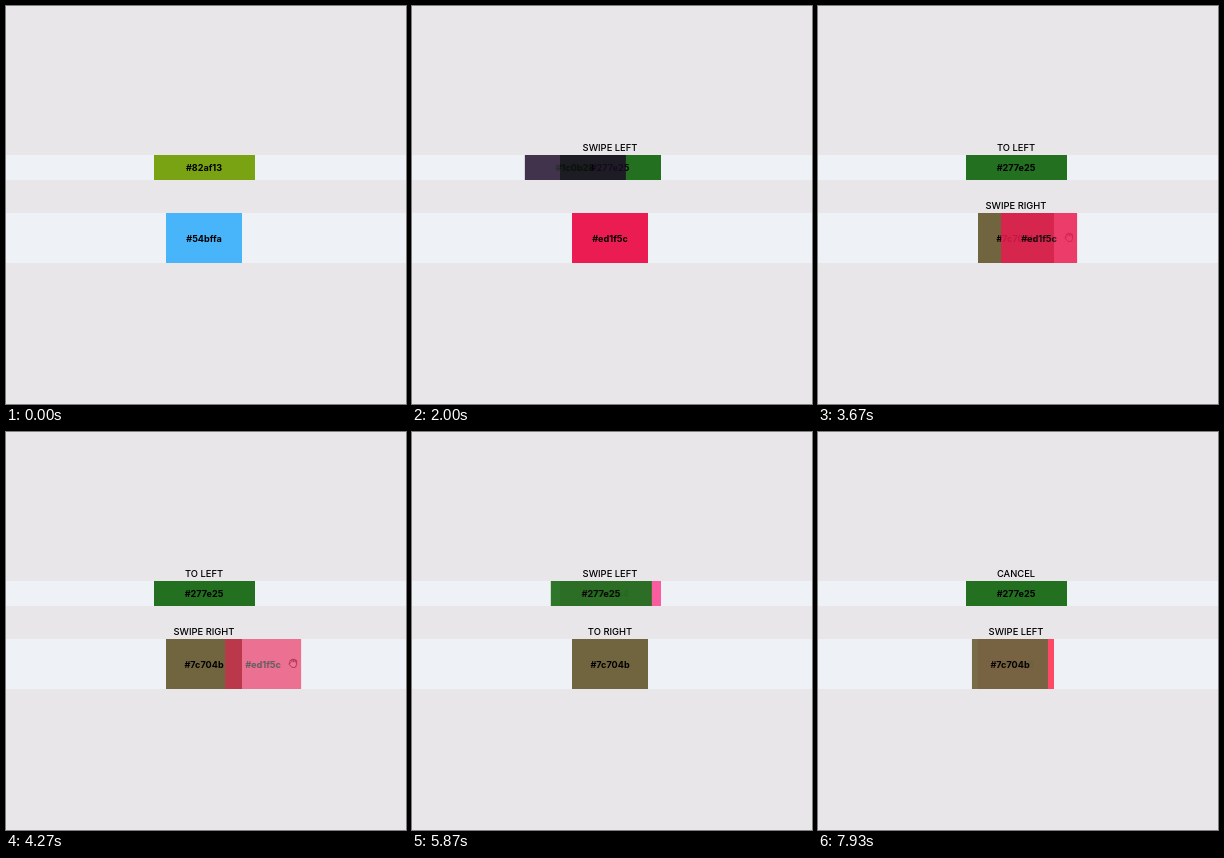
Recreate the animation shown at these times as an HTML page. Size 400x398 px, loop 8000 ms.

```html
<!DOCTYPE html>
<html lang="en">
<head>
<meta charset="utf-8">
<title>Swipe cards</title>
<style>
  html, body { margin: 0; width: 100%; height: 100%; overflow: hidden; background: #e8e6e9; }
  body { position: relative; font-family: Inter, "Open Sans", sans-serif; color: #000; }
  .band { position: absolute; left: 0; width: 100%; background: #eef1f5; overflow: hidden; }
  #top { top: 149px; height: 25px; --w: 101px; --x: 147.5px; }
  #bottom { top: 207px; height: 50px; --w: 76px; --x: 160px; }
  .card {
    position: absolute; top: 0; left: var(--x); width: var(--w); height: 100%;
    display: flex; align-items: center; justify-content: center;
    font-size: 9.1px; font-weight: 700;
  }
  .label {
    position: absolute; left: 98px; width: 200px; height: 12px; line-height: 12px;
    text-align: center; font-size: 9.4px; font-weight: 500; white-space: nowrap; opacity: 0;
  }
  #cursor { position: absolute; left: 0; top: 0; width: 12px; height: 12px; margin: -6px; overflow: visible; }
  #cursor g { fill: #fff; stroke: #222; stroke-width: .8; stroke-linejoin: round; stroke-linecap: round; opacity: 0; }
</style>
</head>
<body>
<div class="band" id="top"></div>
<div class="band" id="bottom"></div>
<svg id="cursor" viewBox="0 0 12 12">
  <g id="arrow"><path d="M3 1V10.5L5.3 8.4 6.8 11.6 8.2 11 6.8 7.9H9.8Z"/></g>
  <g id="open"><path d="M3.4 7.2V3q0-.9.8-.9T5 3V1.7q0-.9.8-.9t.8.9V2.3q0-.8.8-.8t.8.8V3.4q0-.7.8-.7t.8.8V7.6Q9.8 11.2 6.6 11.2 4.6 11.2 3.6 9.6L1.5 6.6q-.3-.8.4-1 .6-.1 1.5 1.6Z"/><path d="M5 3V6M6.6 2.3V6M8.2 3.4V6" fill="none"/></g>
  <g id="fist"><path d="M2.8 6V4.4q0-1 .9-1 .3-1 1.2-.8 1-.8 1.7 0 1-.5 1.5.4 1.3-.2 1.3 1V7.6q0 3-2.9 3-1.8 0-2.8-1.5L2.1 7.3Q1.7 6.3 2.8 6Z"/><path d="M4.9 3V4.8M6.6 2.9V4.8M8.1 3.4V5" fill="none"/></g>
</svg>

<script>
const LOOP = 8000;

const rows = {
  top: {
    width: 101, labelY: 136,
    // card: colour, code, [time, offset, easing] moves
    cards: [
      ['#79a312', '#82af13', [[240, 0, 'ease'], [740, 202]]],
      ['#1c0a26', '#1c0b28', [[1750, 0], [2000, -35, 'ease-out'], [2180, -50, 'ease'], [2680, -202]]],
      ['#237020', '#277e25', [[5600, 0, 'ease-in-out'], [6200, -22], [6270, -22], [6730, 19, 'ease-out'],
        [7000, 28], [7150, 28, 'ease'], [7650, 0]]],
      ['#fa5d9f', '#fe68a4', []]
    ],
    labels: [[0, 'AUTO TRANSITION'], [1750, 'SWIPE LEFT'], [2180, 'TO LEFT'],
      [5600, 'SWIPE LEFT'], [6517, 'SWIPE RIGHT'], [7150, 'CANCEL']]
  },
  bottom: {
    width: 76, labelY: 194,
    cards: [
      ['#48b4f9', '#54bffa', [[240, 0, 'ease'], [740, 152]]],
      ['#ea1c51', '#ed1f5c', [[3480, 0], [3670, 23, 'ease-out'], [4400, 61], [4475, 61, 'ease'], [4975, 152]]],
      ['#716540', '#7c704b', [[7800, 0], [7930, -6], [8000, -9]]],
      ['#ff4766', '#ff4d66', []]
    ],
    labels: [[0, 'AUTO TRANSITION'], [3480, 'SWIPE RIGHT'], [4475, 'TO RIGHT'], [7800, 'SWIPE LEFT']]
  }
};

const cursorPath = [
  [750, 92, -10, 'ease-in-out'], [1090, 222, 162], [1750, 222, 162], [2000, 187, 162, 'ease-out'],
  [2180, 172, 162], [2300, 172, 162, 'ease-in-out'], [2870, 228, 232], [3480, 228, 231],
  [3670, 251, 231, 'ease-out'], [4400, 289, 231], [4475, 289, 231, 'ease-out'], [4870, 215, 211, 'ease-in-out'],
  [5250, 231, 161], [5600, 231, 161, 'ease-in-out'], [6200, 209, 161], [6270, 209, 161],
  [6730, 250, 161, 'ease-out'], [7000, 259, 161], [7150, 259, 161, 'ease-in-out'],
  [7650, 202, 240], [7800, 202, 240], [7930, 196, 240], [8000, 193, 240]
];

const cursorPoses = {
  arrow: [[750, 1070], [2520, 2640], [4900, 5130], [7330, 7460]],
  open: [[1070, 1720], [2180, 2520], [2640, 3450], [4475, 4900], [5130, 5570], [7150, 7330], [7460, 7770]],
  fist: [[1720, 2180], [3450, 4475], [5570, 7150], [7770, LOOP]]
};

function play(el, frames) {
  el.animate(frames, { duration: LOOP, iterations: Infinity });
}

// Plays style keys, holding the first and last one to the ends of the loop.
function move(el, keys, style) {
  if (!keys.length) return;
  const frames = keys.map(key => ({ offset: key[0] / LOOP, easing: key[3] || 'linear', ...style(key) }));
  const first = { ...frames[0], offset: 0, easing: 'linear' };
  const last = { ...frames[frames.length - 1], offset: 1 };
  play(el, [first, ...frames, last]);
}

function showDuring(el, ranges) {
  const key = (time, opacity) => ({ offset: time / LOOP, opacity, easing: 'steps(1, end)' });
  play(el, [key(0, 0), ...ranges.flatMap(([from, to]) => [key(from, 1), key(to, 0)]), key(LOOP, 0)]);
}

function add(parent, className, text) {
  const el = document.createElement('div');
  el.className = className;
  el.textContent = text;
  parent.append(el);
  return el;
}

const cursor = document.getElementById('cursor');

for (const [id, { width, labelY, cards, labels }] of Object.entries(rows)) {
  const band = document.getElementById(id);
  cards.forEach(([color, code, moves], i) => {
    const card = add(band, 'card', code);
    card.style.background = color;
    card.style.zIndex = cards.length - i;
    move(card, moves.map(([time, x, easing]) => [time, x, 0, easing]), ([, x]) => ({
      transform: `translateX(${x}px)`,
      opacity: 1 - Math.abs(x) / width / 2
    }));
  });
  labels.forEach(([from, text], i) => {
    const label = add(document.body, 'label', text);
    label.style.top = labelY + 'px';
    showDuring(label, [[from, i + 1 < labels.length ? labels[i + 1][0] : LOOP]]);
  });
}

document.body.append(cursor);
move(cursor, cursorPath, ([, x, y]) => ({ transform: `translate(${x}px, ${y}px)` }));
for (const [pose, ranges] of Object.entries(cursorPoses)) {
  showDuring(document.getElementById(pose), ranges);
}
</script>
</body>
</html>
```
